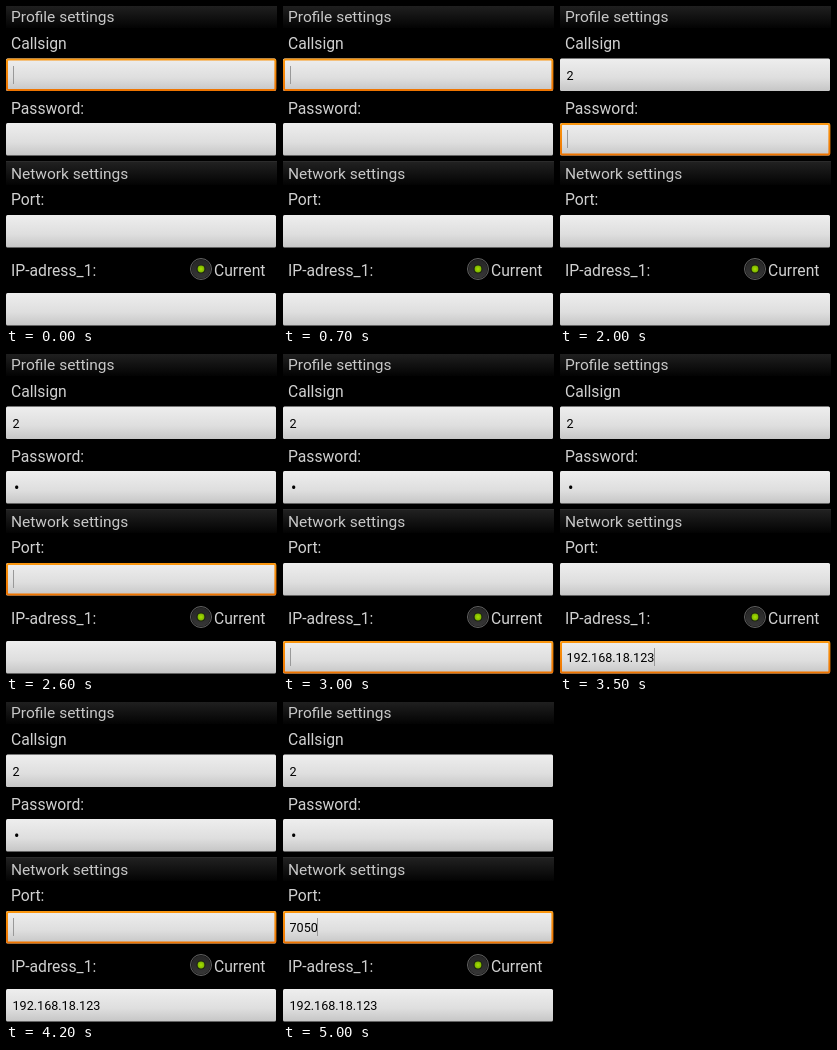
Write an HTML page that moves like this. It is 271 by 320 pixels and loops after 5.1 s.

```html
<!DOCTYPE html>
<html lang="en">
<head>
<meta charset="utf-8">
<title>Settings form</title>
<style>
html, body { margin: 0; width: 100%; height: 100%; overflow: hidden; background: #000; }
svg { display: block; width: 271px; height: 320px; font: 15.7px Roboto, sans-serif; fill: #d0d0d0; }
.heading { font-size: 15.5px; fill: #c8c8c8; }
.value { font-size: 12.6px; fill: #000; }
.value.secret { font-size: 16px; }
</style>
</head>
<body>
<svg id="stage" viewBox="0 0 271 320">
  <defs>
    <linearGradient id="head" x2="0" y2="1">
      <stop stop-color="#222"/><stop offset="1" stop-color="#030303"/>
    </linearGradient>
    <linearGradient id="box" x2="0" y2="1">
      <stop stop-color="#eee"/><stop offset=".6" stop-color="#dedede"/><stop offset="1" stop-color="#c6c6c6"/>
    </linearGradient>
    <linearGradient id="ring" x2="0" y2="1">
      <stop stop-color="#fa960f"/><stop offset="1" stop-color="#ee7400"/>
    </linearGradient>
    <linearGradient id="disc" x2="0" y2="1">
      <stop stop-color="#262626"/><stop offset="1" stop-color="#363636"/>
    </linearGradient>
    <radialGradient id="dot">
      <stop stop-color="#a8e000"/><stop offset="1" stop-color="#7cb400"/>
    </radialGradient>
  </defs>
</svg>
<script>
const LOOP = 5100;
const stage = document.getElementById('stage');

function add(tag, attrs, text = '') {
  const el = document.createElementNS('http://www.w3.org/2000/svg', tag);
  for (const key in attrs) el.setAttribute(key, attrs[key]);
  el.textContent = text;
  stage.append(el);
  return el;
}

function addHeading(text, y) {
  add('rect', { y, width: 271, height: 24, fill: 'url(#head)' });
  add('rect', { y, width: 271, height: 1, fill: '#2c2c2c' });
  add('text', { x: 5, y: y + 18, class: 'heading' }, text);
}
addHeading('Profile settings', -2);
addHeading('Network settings', 155);

const labels = [
  ['Callsign', 5, 43], ['Password:', 5, 107.5], ['Port:', 5, 199],
  ['IP-adress_1:', 5, 270.4], ['Current', 208, 270.4]
];
for (const [text, x, y] of labels) add('text', { x, y }, text);

// Radio button
const circle = (r, attrs) => add('circle', { cx: 195, cy: 263, r, ...attrs });
circle(10.5, { fill: '#111', stroke: '#6c6c6c', 'stroke-width': .9 });
const disc = circle(9.5, {});
circle(4.5, { fill: '#1c2410' });
circle(3.4, { fill: 'url(#dot)' });

function makeField(top, secret) {
  const x = secret ? 8 : 6.5;
  const base = Math.round(top) + (secret ? 22 : 21);
  add('rect', { y: top, width: 270, height: 32.4, rx: 1.5, fill: 'url(#box)' });
  const ring = add('rect', { x: 1, y: top + 1, width: 268.4, height: 30.4, rx: 1.5, fill: 'none', stroke: 'url(#ring)', 'stroke-width': 2 });
  const text = add('text', { x, y: base, class: secret ? 'value secret' : 'value' });
  const caret = add('rect', { y: Math.round(top) + 7, width: 1, height: 18, fill: '#999' });
  return (value, focused, caretOn) => {
    if (text.textContent !== value) text.textContent = value;
    const end = value ? x + text.getComputedTextLength() : 7;
    caret.setAttribute('x', Math.floor(end));
    ring.style.display = focused ? '' : 'none';
    caret.style.display = focused && caretOn ? '' : 'none';
  };
}

const fields = {
  call: makeField(52.5),
  pass: makeField(117, true),
  port: makeField(209),
  ip: makeField(287)
};

// [time, focused control, its text, caret visible]
const steps = [
  [0, 'call', '', true], [100, 'call', '', false], [700, 'call', '', true], [1200, 'call', '', false],
  [1600, 'call', '2', true],
  [2000, 'pass', '', true], [2300, 'pass', '•', true],
  [2600, 'port', '', true],
  [3000, 'ip', '', true], [3300, 'ip', '192.', true], [3400, 'ip', '192.168.18', true],
  [3500, 'ip', '192.168.18.123', true],
  [3800, 'radio', '', false],
  [4200, 'port', '', true], [4500, 'port', '7050', true]
];

function draw(now) {
  const t = now % LOOP;
  const values = {};
  let focus, caretOn;
  for (const [time, name, value, caret] of steps) {
    if (time > t) break;
    values[name] = value;
    focus = name;
    caretOn = caret;
  }
  for (const name in fields) fields[name](values[name] || '', name === focus, caretOn);
  disc.setAttribute('fill', focus === 'radio' ? '#f88a10' : 'url(#disc)');
}

const start = performance.now();
function tick() {
  draw(performance.now() - start);
  requestAnimationFrame(tick);
}
tick();
</script>
</body>
</html>
```
